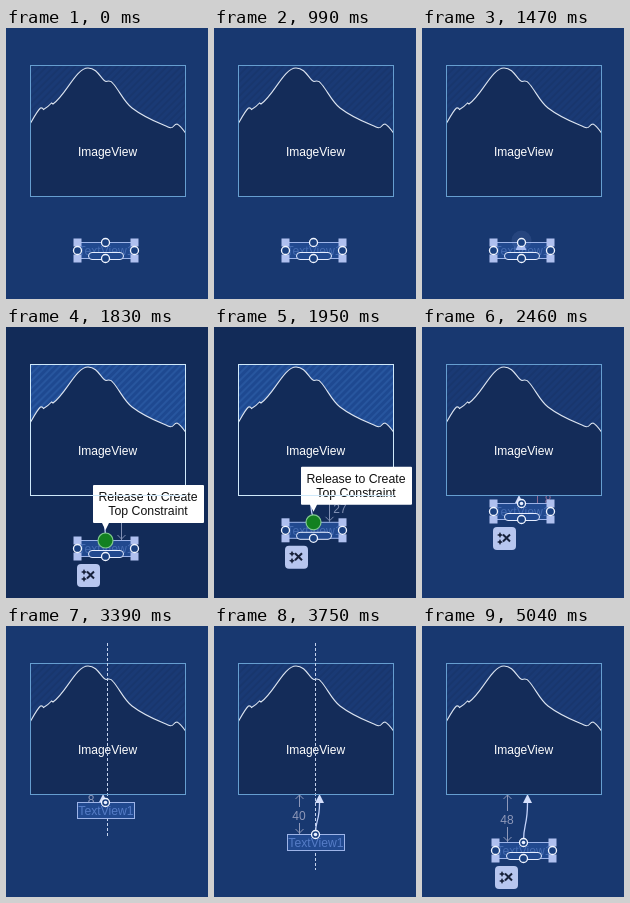
An HTML page for the animation above (5400 ms loop, 202 px wide and 271 px high).

```html
<!DOCTYPE html>
<html lang="en">
<head>
<meta charset="utf-8">
<style>
html, body { margin: 0; width: 100%; height: 100%; overflow: hidden; background: #183870; }
svg { display: block; width: 100vw; height: 100vh; }
text { font-family: "Liberation Sans", Arial, sans-serif; font-size: 12px; text-anchor: middle; }
</style>
</head>
<body>
<svg viewBox="0 0 202 271" fill="none">
  <defs>
    <pattern id="hatch" width="5" height="5" patternUnits="userSpaceOnUse" patternTransform="rotate(45)">
      <path id="hatchLine" d="M1 0V5" stroke-width="1.4"/>
    </pattern>
    <clipPath id="frameClip"><rect x="24" y="37" width="156" height="132"/></clipPath>
  </defs>
  <rect id="bg" width="202" height="271"/>
  <g clip-path="url(#frameClip)">
    <rect id="sky" x="24" y="37" width="156" height="132"/>
    <rect x="24" y="37" width="156" height="132" fill="url(#hatch)"/>
    <path id="hill" stroke="#dce4f0" stroke-width="1.1" d="M23 98C27 91 31 83 34.500 80Q36.500 79.500 37.500 81.500Q42 79 45.500 75L47 76C60 67 70 40 82 40C92 40 95 52 100 53.500Q105 52 107 55.500C113 62 118 74 126 80C139 90 153 95 162 99C168 102 167 96 171 96Q174 97 181 107V170H23Z"/>
  </g>
  <rect id="frame" x="24.500" y="37.500" width="155" height="131"/>
  <text x="101.500" y="128" fill="#fff">ImageView</text>

  <g id="dimension">
    <path id="dimLine"/>
    <text id="dimText"/>
  </g>
  <path id="link" stroke="#c3d2fa" stroke-width="1.3"/>
  <path id="arrow" fill="#d5dffb"/>
  <path id="guide" stroke="#c5d3ee" stroke-dasharray="3 2"/>

  <g id="widget">
    <rect x=".5" y=".5" width="57" height="16" fill="#21498f" stroke="#9db4e8"/>
    <text id="caption" x="29" y="13" style="font-size:12.200px">TextView1</text>
    <g id="handles"></g>
    <circle id="glow" r="10" fill="#9db8f5"/>
    <path id="spark" d="M0 -6L5.500 5H-5.500Z" fill="#a9bdf2"/>
    <g id="anchor">
      <circle cx="28.500" cy=".5" r="4" fill="#1a407f" stroke="#f2f6ff" stroke-width="1.300"/>
      <circle id="anchorDot" cx="28.500" cy=".5" r="1.800" fill="#e8efff"/>
    </g>
    <g id="button" transform="translate(0 24)">
      <rect width="23" height="23" rx="4" fill="#b7c6ef"/>
      <path d="M10 7.500L17 14.500M17 7.500L10 14.500" stroke="#17213a" stroke-width="2"/>
      <path d="M7 5l1 2 2 1-2 1-1 2-1-2-2-1 2-1zM7 12l1 2 2 1-2 1-1 2-1-2-2-1 2-1z" fill="#17213a"/>
    </g>
    <g id="tooltip">
      <path d="M17 -55H126Q127 -55 127 -54V-18Q127 -17 126 -17H32L28.500 -10L25 -17H17Q16 -17 16 -18V-54Q16 -55 17 -55Z" fill="#fff"/>
      <g fill="#111" style="font-size:12.300px">
        <text x="71" y="-39" style="font-size:12.300px">Release to Create</text>
        <text x="71" y="-25" style="font-size:12.300px">Top Constraint</text>
      </g>
    </g>
    <circle id="target" cx="28.500" cy=".5" fill="#128020" stroke="#7fc88e" stroke-width="1.200"/>
  </g>
  <path id="baseLine" d="M24 168.500H180"/>
</svg>
<script>
const $ = id => document.getElementById(id);
const set = (id, attrs) => {
  for (const key in attrs) $(id).setAttribute(key, attrs[key]);
};
const show = (id, opacity) => set(id, { opacity: +opacity });
const span = (t, from, to) => Math.min(1, Math.max(0, (t - from) / (to - from)));
const ease = p => (1 - Math.cos(Math.PI * p)) / 2;
const mix = (a, b, p) => `rgb(${a.map((v, i) => Math.round(v + (b[i] - v) * p))})`;

const LOOP = 5400;
const BASE = 168;

const square = (x, y) => `<rect x="${x - 3.5}" y="${y - 3.5}" width="8" height="8" fill="#afc0ef"/>`;
const ring = (x, y) => `<circle cx="${x}" cy="${y}" r="4" fill="#1a407f" stroke="#f2f6ff" stroke-width="1.3"/>`;
$('handles').innerHTML =
  [0, 57].map(x => square(x, 0) + square(x, 16)).join('') +
  '<rect x="11.5" y="10.5" width="35" height="7" rx="3.5" fill="#21498f" stroke="#e4ecff"/>' +
  ring(.5, 8.5) + ring(57.5, 8.5) + ring(28.5, 16.5);

function topAt(t) {
  if (t < 3390) return 214 - 38 * ease(span(t, 1800, 2100));
  return t < 4530 ? 176 + 32 * ease(span(t, 3390, 3750)) : 216;
}

function drawDimension(t, y) {
  const gap = Math.round(y - BASE);
  const visible = t >= 1590;
  show('dimension', visible);
  if (!visible) return;
  const mid = (BASE + y) / 2;
  const centered = t >= 3390;
  const x = centered ? 85.5 : 115.5;
  const color = centered ? '#8e98b9' : t < 2130 ? '#8190b3' : '#8e6b94';
  let d = `M${x} 169V${y}`;
  if (centered) d = gap > 20 ? `M${x} 169V${mid - 7}M${x} ${mid + 9}V${y}` : '';
  if (gap > 20) d += `M${x - 4} ${y - 5}l4 4 4-4`;
  if (centered && gap > 20) d += `M${x - 4} 173l4-4 4 4`;
  set('dimLine', { d, stroke: color });
  set('dimText', { x: centered ? 85 : 126, y: centered ? mid + 6 : mid + 5, fill: color });
  $('dimText').textContent = gap;
}

function drawLink(t, x, y) {
  const visible = t >= 1590;
  show('link', visible);
  show('arrow', visible);
  const tip = 97 + 8.5 * span(t, 3390, 3510);
  const start = x + 28.5;
  const mid = (y + 177) / 2;
  set('link', { d: y > 183 ? `M${start} ${y}C${start} ${mid} ${tip} ${mid + 4} ${tip} 177` : '' });
  set('arrow', { d: `M${tip} 168L${tip + 4.5} 177H${tip - 4.5}Z` });
}

function drawHover(t) {
  const side = t >= 510 && t < 660;
  const top = t >= 990 && t < 1560;
  const strength = side ? Math.sin(Math.PI * span(t, 480, 660)) * .25
    : top ? .2 * span(t, 990, 1140) * (1 - .65 * span(t, 1320, 1530)) : 0;
  set('glow', { cx: side ? 57.5 : 28.5, cy: side ? 8.5 : -1.5, opacity: strength });
  const rise = span(t, 1290, 1470);
  set('spark', { transform: `translate(28 ${5 - 2 * rise})`, opacity: top ? rise : 0 });
}

function render(t) {
  const y = topAt(t);
  const x = 71 + 2 * ease(span(t, 3390, 3750));
  const drag = span(t, 1560, 1710) * (1 - span(t, 2130, 2250));
  const dragging = t >= 1560 && t < 2130;
  const selected = t < 3390 || t >= 5040;
  const connected = t >= 2130;
  const stroke = mix([102, 158, 208], [207, 233, 250], drag);

  set('bg', { fill: mix([24, 56, 112], [18, 43, 88], drag) });
  set('sky', { fill: mix([26, 58, 117], [30, 73, 145], drag) });
  set('hatchLine', { stroke: mix([23, 52, 106], [43, 91, 164], drag) });
  set('hill', { fill: mix([20, 44, 89], [18, 43, 88], drag) });
  set('frame', { stroke });
  set('baseLine', { stroke });
  set('widget', { transform: `translate(${x} ${y})` });
  set('caption', { fill: selected ? '#456bb0' : '#557cc6' });

  drawDimension(t, y);
  drawLink(t, x, y);
  drawHover(t);

  show('guide', t >= 3390 && t < 5040);
  set('guide', { d: `M101.5 17V${y + 36}` });
  show('handles', selected);
  show('anchorDot', connected);
  show('button', selected && t >= 1590);
  show('tooltip', dragging ? span(t, 1560, 1680) : 0);
  show('target', dragging);
  set('target', { r: 4 + 3.5 * span(t, 1560, 1680) });
}

function tick(now) {
  render(now % LOOP);
  requestAnimationFrame(tick);
}
render(0);
requestAnimationFrame(tick);
</script>
</body>
</html>
```
